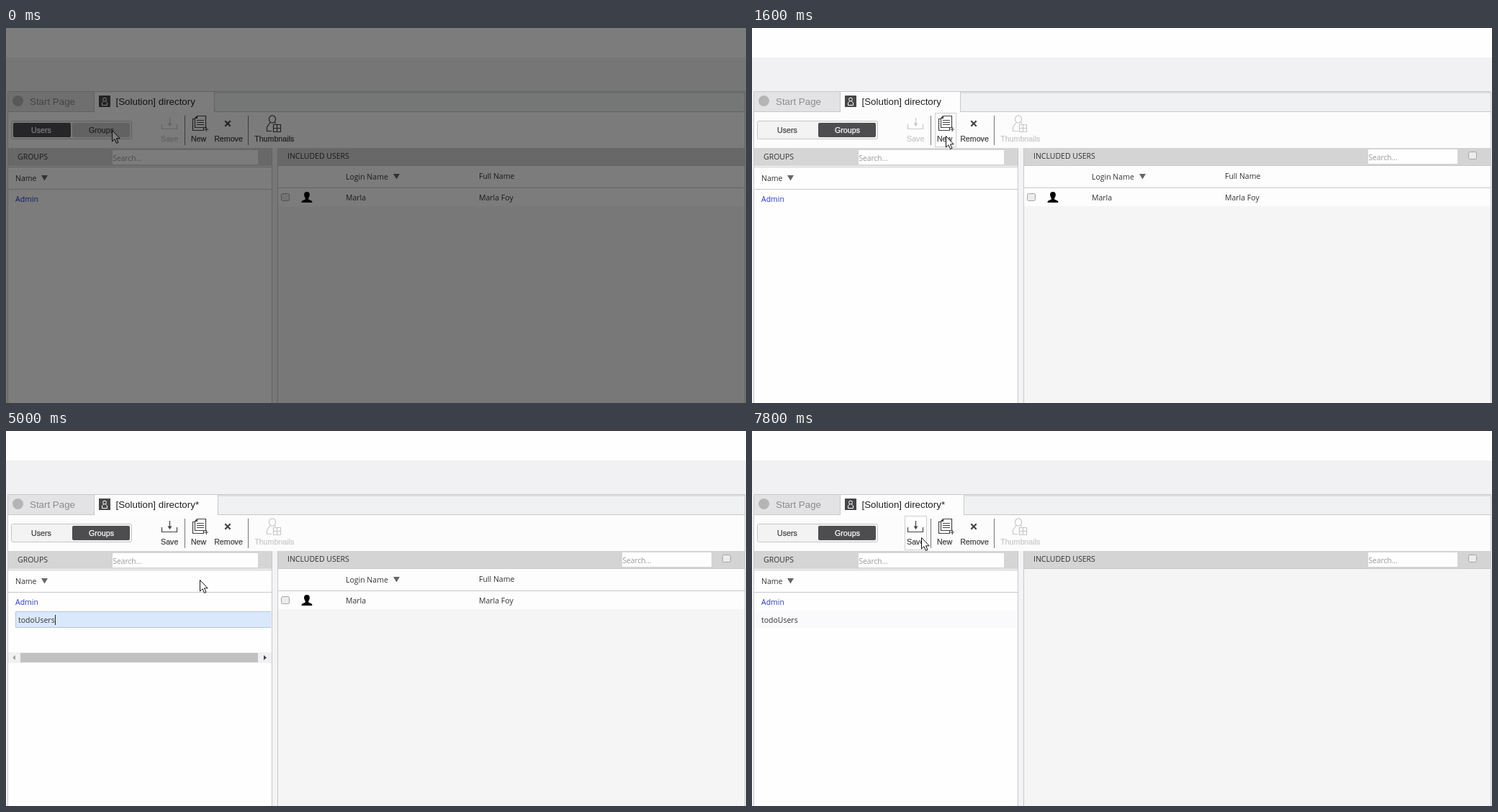
These frames come from a looping animation (1028x522 px, 8 s). An HTML page:

```html
<!DOCTYPE html>
<html lang="en">
<head>
<meta charset="utf-8">
<title>User directory</title>
<style>
  html, body { margin: 0; width: 100%; height: 100%; overflow: hidden; background: #fefefe; }
  svg { display: block; width: 1028px; height: 522px; }
  text { font: 10.5px "Open Sans", "Noto Sans", sans-serif; fill: #333; white-space: pre; }
  .tab { font: 13.33px "Liberation Sans", Arial, sans-serif; fill: #222; }
  .btn { font: 10.67px "Liberation Sans", Arial, sans-serif; fill: #444; stroke: #444; stroke-width: .25px; text-anchor: middle; }
  .hint { font-size: 10.2px; fill: #999; }
  .icon { fill: none; stroke: #444; stroke-width: 1.2px; }
  .line { fill: none; stroke: #c8c8c8; }
  .hover { fill: #fff; stroke: #cfcfcf; }
  .check { fill: #ececec; stroke: #a3a3a3; }
</style>
</head>
<body>
<svg viewBox="0 0 1028 522">
  <!-- page and tabs -->
  <rect width="1028" height="522" fill="#fefefe"/>
  <rect y="41" width="1028" height="47" fill="#f1f1f4"/>
  <rect y="88" width="1028" height="434" fill="#f4f4f6"/>
  <rect x="3" y="88" width="1023" height="29" fill="#f0f1f2"/>
  <rect x="3" y="88" width="1023" height="3" fill="#dce1e0"/>
  <rect x="3" y="89" width="120" height="28" fill="#e3e3e5"/>
  <path class="line" d="M2.5 522V88.5H1026.5V522M122.5 89V117"/>
  <rect x="3" y="117" width="1023" height="50" fill="#fcfcfc"/>
  <path class="line" d="M3 116.5H1026"/>
  <rect id="tab" x="123" y="89" height="28" fill="#fdfdfd"/>
  <path id="tabEdge" class="line" d="M.5 89V117"/>
  <circle cx="16.5" cy="101.5" r="7.5" fill="#b5b5b5"/>
  <text class="tab" x="33" y="107" style="fill:#8b8b8d">Start Page</text>
  <rect x="129" y="94" width="16" height="16" fill="#474749"/>
  <g fill="none" stroke="#fff">
    <circle cx="137" cy="99.5" r="2.4"/>
    <path d="M135.8 102L133.5 104V107.5H140.5V104L138.2 102"/>
  </g>
  <text id="tabName" class="tab" x="152.5" y="107"></text>

  <!-- toolbar -->
  <rect x="7.5" y="129.5" width="167" height="25" rx="2" fill="#f3f3f3" stroke="#c6c6c6"/>
  <rect id="usersBtn" x="10" y="132" width="80" height="20" rx="2"/>
  <rect id="groupsBtn" x="92" y="132" width="80" height="20" rx="2"/>
  <text id="usersText" class="btn" x="49" y="146">Users</text>
  <text id="groupsText" class="btn" x="132.5" y="146">Groups</text>
  <path d="M248.5 122V163M336.5 122V163" stroke="#777"/>
  <rect id="saveHover" class="hover" x="212.5" y="118.5" width="30" height="47"/>
  <rect id="newHover" class="hover" x="254.5" y="118.5" width="29" height="47"/>
  <g id="save">
    <path class="icon" d="M216.5 134V140.5H237.5V134M227.5 125V136"/>
    <path d="M224.5 132.5H230.5L227.5 137Z" fill="#444"/>
    <text class="btn" x="227.2" y="158">Save</text>
  </g>
  <g>
    <path class="icon" d="M265.5 122.5H277.5V138.5H262.5V125.5ZM265.5 122.5V125.5H262.5M262 126.5H259.5V142.5H274.5V139"/>
    <path class="icon" d="M265 128.5H275M265 131.5H275M265 134.5H275M275.5 141H281M278.3 138V144"/>
    <text class="btn" x="267.6" y="158">New</text>
  </g>
  <path d="M304.3 129.3L311.7 136.7M311.7 129.3L304.3 136.7" stroke="#444" stroke-width="2.2"/>
  <text class="btn" x="309" y="158">Remove</text>
  <g id="thumbs">
    <ellipse class="icon" cx="370" cy="127" rx="4.6" ry="5.2"/>
    <path class="icon" d="M367 131.5L362.5 138V143.5H369M373 131.5L375 133"/>
    <path class="icon" d="M371.5 134.5H381.5V144.5H371.5ZM376.5 134.5V144.5M371.5 139.5H381.5"/>
    <text class="btn" x="372.7" y="158">Thumbnails</text>
  </g>

  <!-- left panel -->
  <rect x="3" y="167" width="366" height="25" fill="#d5d5d5"/>
  <rect x="3" y="192" width="366" height="330" fill="#fefefe"/>
  <path class="line" d="M3 193.5H369M3 224.5H369M369.5 167V522"/>
  <text x="16" y="183">GROUPS</text>
  <rect x="148" y="170" width="202" height="20" fill="#fefefe"/>
  <text class="hint" x="148.5" y="185">Search...</text>
  <text x="13" y="213">Name</text>
  <path d="M49 205H58L53.5 212.5Z" fill="#666"/>
  <text x="13" y="242" style="fill:#2638c8">Admin</text>
  <g id="editor">
    <rect x="13.5" y="251.5" width="355" height="22" fill="#d9e8fb"/>
    <path d="M368 251.5H13.5V273.5H368" fill="none" stroke="#b5c6e0"/>
    <rect id="selection" x="17" y="256" height="14" fill="#3390f0"/>
    <text id="field" x="17" y="267"></text>
    <path id="spell" d="M17 269.5H74" stroke="#c0436a" stroke-dasharray="2 1"/>
    <path id="caret" d="M.5 256V270" stroke="#222"/>
    <rect x="3" y="308" width="366" height="15" fill="#f1f1f4"/>
    <rect x="20" y="309" width="330" height="13" fill="#c1c1c1"/>
    <path d="M13 312V319L9 315.5Z" fill="#a3a3a3"/>
    <path d="M358 312V319L362 315.5Z" fill="#444"/>
  </g>
  <g id="saved">
    <rect x="3" y="251" width="365" height="23" fill="#fafafc"/>
    <text x="13" y="267">todoUsers</text>
  </g>

  <!-- right panel -->
  <rect x="378" y="167" width="648" height="355" fill="#f5f5f5"/>
  <rect x="378" y="167" width="648" height="24" fill="#d4d4d4"/>
  <path class="line" d="M377.5 167V522M1026.5 167V522M378 191.5H1026"/>
  <text x="391" y="182">INCLUDED USERS</text>
  <g id="filter">
    <rect x="856" y="169" width="124" height="20" fill="#fefefe"/>
    <text class="hint" x="856.5" y="184">Search...</text>
    <rect class="check" x="995.5" y="172.5" width="11" height="10" rx="2"/>
  </g>
  <g id="members">
    <rect x="378" y="192" width="648" height="56" fill="#fdfdfd"/>
    <path class="line" d="M378 222.5H1026"/>
    <text x="472" y="211">Login Name</text>
    <path d="M538 203H547L542.5 210.5Z" fill="#666"/>
    <text x="657" y="210">Full Name</text>
    <rect class="check" x="382.5" y="230.5" width="11" height="10" rx="2"/>
    <path d="M418 228C414.5 228 413.7 231 414.3 233.5C414.6 235.5 416 236.5 416 238C415 240 410.5 239 410.5 243H425.5C425.5 239 421 240 420 238C420 236.5 421.4 235.5 421.7 233.5C422.3 231 421.5 228 418 228Z"/>
    <text x="472" y="240">Marla</text>
    <text x="657" y="240">Marla Foy</text>
  </g>

  <path id="cursor" d="M.5 .5V16L4 12.7L6.6 18.5L9 17.4L6.5 11.8H11.2Z" fill="#fff" stroke="#111"/>
  <rect id="shade" width="1028" height="522" fill="#000" opacity=".51"/>
</svg>
<script>
  const LOOP = 8000, TICK = 200;
  const CLICK_GROUPS = 400, CLICK_NEW = 2000, COMMIT = 6400;

  // time, x, y of the pointer tip
  const path = [
    [0, 147, 142], [800, 147, 142], [1600, 269, 150], [2200, 269, 150],
    [2600, 269, 207], [5400, 269, 207], [6200, 294, 282], [6400, 302, 346],
    [6600, 262, 210], [6800, 235, 148], [LOOP, 235, 148]
  ];

  const typing = [
    [CLICK_NEW, "newGroup1"], [3000, "t"], [3400, "to"], [3600, "todo"],
    [4200, "todoU"], [4400, "todoUs"], [4600, "todoUse"], [5000, "todoUsers"]
  ];

  const $ = id => document.getElementById(id);
  const show = (id, on) => $(id).style.display = on ? "" : "none";
  const fill = (id, color) => $(id).style.fill = color;

  function pointer(t) {
    const i = path.findIndex(p => p[0] > t);
    const [t0, x0, y0] = path[i - 1], [t1, x1, y1] = path[i];
    const k = (t - t0) / (t1 - t0);
    return [x0 + (x1 - x0) * k, y0 + (y1 - y0) * k].map(Math.round);
  }

  function toggle(name, active, idle) {
    fill(name + "Btn", active ? "#4d4c4f" : idle);
    const color = active ? "#fff" : "#444";
    fill(name + "Text", color);
    $(name + "Text").style.stroke = color;
  }

  function drawEditor(t) {
    const step = typing.filter(s => s[0] <= t).pop();
    if (!step) return;
    const selected = step === typing[0];
    const field = $("field");
    field.textContent = step[1];
    fill("field", selected ? "#fff" : "#333");
    const width = field.getComputedTextLength();
    $("selection").setAttribute("width", width);
    $("caret").setAttribute("transform", `translate(${Math.round(17 + width)})`);
    show("selection", selected);
    show("spell", selected);
    show("caret", !selected);
  }

  function draw(time) {
    const t = Math.floor((time % LOOP) / TICK) * TICK;
    const groups = t >= CLICK_GROUPS, changed = t >= CLICK_NEW, committed = t >= COMMIT;
    const [x, y] = pointer(t);
    const over = (left, right) => x >= left && x <= right && y >= 118 && y <= 165;

    const tabEnd = changed ? 294 : 289;
    $("tabName").textContent = "[Solution] directory" + (changed ? "*" : "");
    $("tab").setAttribute("width", tabEnd - 123);
    $("tabEdge").setAttribute("transform", `translate(${tabEnd})`);

    toggle("users", !groups, "transparent");
    toggle("groups", groups, "#c9c9c9");
    $("save").setAttribute("opacity", changed ? 1 : .28);
    $("thumbs").setAttribute("opacity", groups ? .28 : 1);
    show("saveHover", changed && over(212, 242));
    show("newHover", over(254, 283));

    show("filter", groups);
    show("members", !committed);
    show("editor", changed && !committed);
    show("saved", committed);
    if (changed && !committed) drawEditor(t);

    $("cursor").setAttribute("transform", `translate(${x} ${y})`);
    show("shade", t < TICK);
  }

  const start = performance.now();
  function loop() {
    draw(performance.now() - start);
    requestAnimationFrame(loop);
  }
  loop();
</script>
</body>
</html>
```
